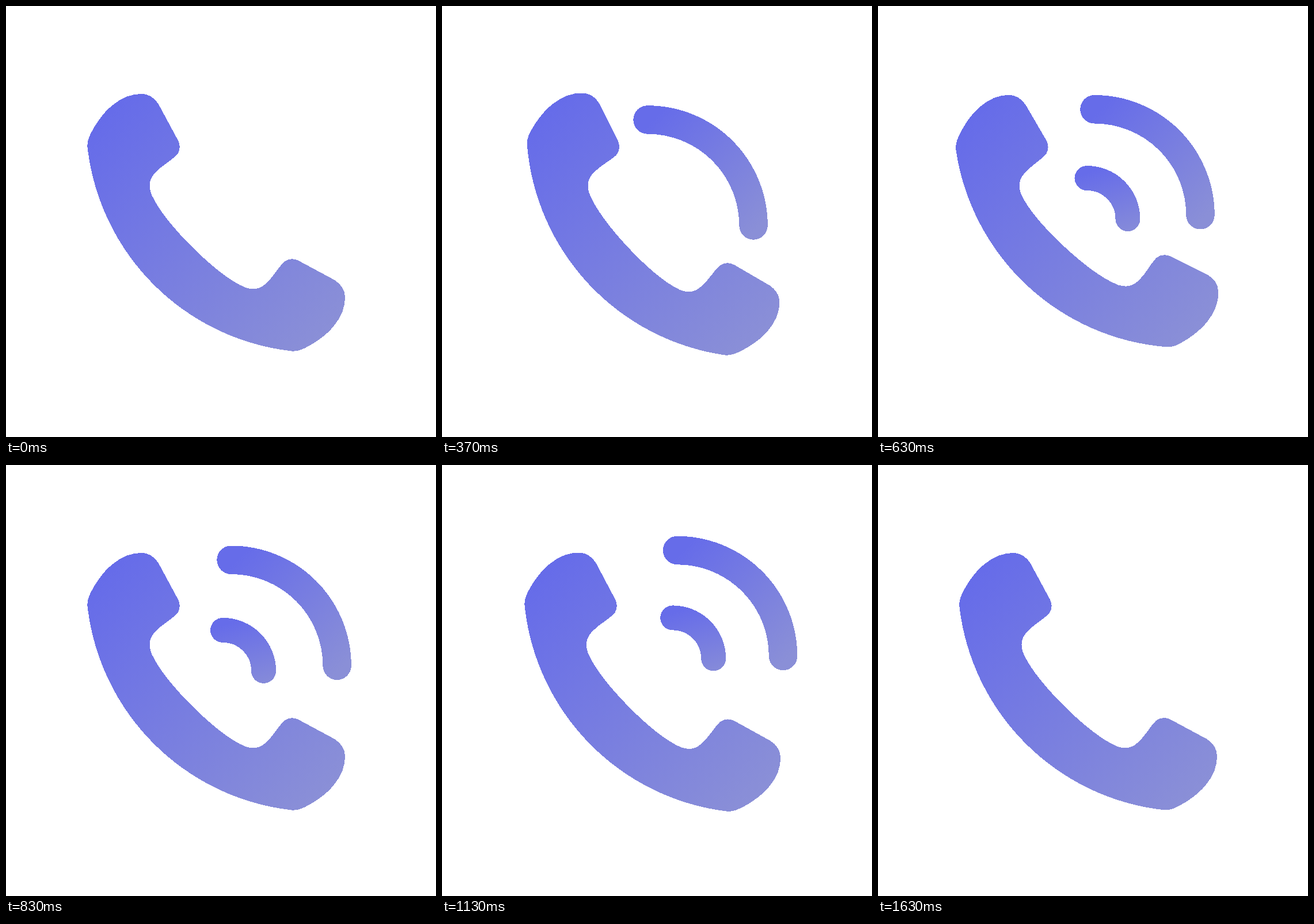
Animation, 747 px wide and 750 px high, one loop 1660 ms. Source, as an HTML page:

```html
<!DOCTYPE html>
<html lang="en">
<head>
<meta charset="utf-8">
<title>Ringing phone</title>
<style>
  html, body { margin: 0; width: 100%; height: 100%; overflow: hidden; background: #fff; }
  svg { display: block; width: 100vw; height: 100vh; shape-rendering: crispEdges; }
  .wave { fill: none; stroke-linecap: round; }
  stop:first-child { stop-color: #666ce9; }
  stop:last-child { stop-color: #8a8fd7; }
</style>
</head>
<body>
<svg viewBox="0 0 747 750">
  <defs>
    <linearGradient id="phoneFill" gradientUnits="userSpaceOnUse" x1="175" y1="190" x2="560" y2="560">
      <stop offset="0"/><stop offset="1"/>
    </linearGradient>
    <linearGradient id="outerFill" gradientUnits="userSpaceOnUse" x1="5" y1="5" x2="190" y2="190">
      <stop offset="0"/><stop offset="1"/>
    </linearGradient>
    <linearGradient id="innerFill" gradientUnits="userSpaceOnUse" x1="10" y1="-12" x2="50" y2="118">
      <stop offset="0"/><stop offset="1"/>
    </linearGradient>
  </defs>
  <path id="phone" fill="url(#phoneFill)" d="M141.5 245.5
    C141 239 142 235 144 229 C151 212 167 187 184.5 173
    C202 158 220 153 235 153 C248 153 258 160 265 171
    L299 234 C303 242 303 251 297 259
    C286 270 270 278 259 290.5 C248 302 248 314 252 326
    C263 353 292 388 323 419 C354 450 389 479 416 490
    C428 494 440 494 451.5 483 C464 472 472 456 483 445
    C491 439 500 439 508 443 L571 477
    C582 484 589 494 589 507 C589 522 584 540 569 557.5
    C555 575 530 591 513 598 C507 600 503 601 496.5 600.5
    A402.5 402.5 0 0 1 141.5 245.5Z"/>
  <path id="outer" class="wave" stroke="url(#outerFill)" stroke-width="49.5" d="M0 0A184 184 0 0 1 184 184"/>
  <path id="inner" class="wave" stroke="url(#innerFill)" stroke-width="43" d="M0 0A71 71 0 0 1 71 71"/>
</svg>
<script>
  const LOOP = 1660, FPS = 30, FRAMES = 50;
  const PIVOT = '284 434';
  const SWING = [0, 2, -2, 2, -2, 0]; // degrees, one key every 10 frames
  const byId = id => document.getElementById(id);
  const phone = byId('phone');

  const waves = [
    { el: byId('outer'), start: 0, x: 344.4, y: 210.1, dx: 68.3, dy: -65.6 },
    { el: byId('inner'), start: 10, x: 353.6, y: 307.9, dx: 72.7, dy: -64.8 }
  ];

  const ease = u => u * u * (3 - 2 * u);

  function swingAt(frame) {
    const key = Math.floor(frame / 10);
    return SWING[key] + (SWING[key + 1] - SWING[key]) * ease(frame % 10 / 10);
  }

  function placeWave({ el, start, x, y, dx, dy }, frame) {
    const age = frame - start;
    const visible = age > 5 && age < 35;
    el.setAttribute('visibility', visible ? 'visible' : 'hidden');
    if (!visible) return;
    const p = ease(age / 40);
    el.setAttribute('transform', `translate(${x + dx * p} ${y + dy * p})`);
  }

  function draw(now) {
    // The picture advances in whole steps of 1/30 s, on a 10 ms clock.
    const t = now % LOOP;
    const frame = Math.min(FRAMES - 1, Math.floor((t + 3.4) * FPS / 1000));
    phone.setAttribute('transform', `rotate(${swingAt(frame)} ${PIVOT})`);
    waves.forEach(wave => placeWave(wave, frame));
  }

  const began = performance.now();
  function tick() {
    draw(performance.now() - began);
    requestAnimationFrame(tick);
  }
  tick();
</script>
</body>
</html>
```
